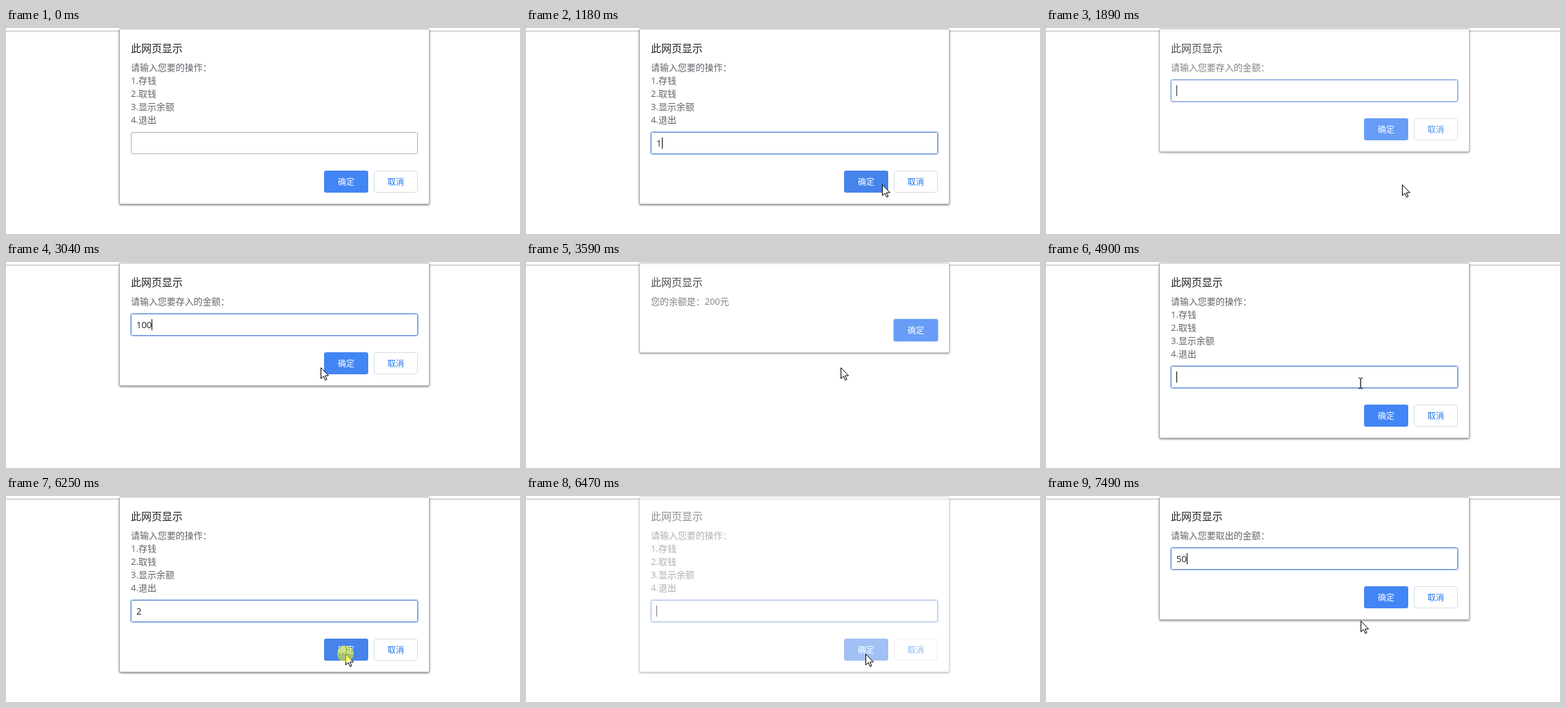
These frames come from a looping animation (745 by 299 pixels, 8000 ms). An HTML page:

```html
<!DOCTYPE html>
<html lang="zh-CN">
<head>
<meta charset="utf-8">
<style>
  html, body { margin: 0; width: 100%; height: 100%; overflow: hidden; background: #fff; }
  svg { display: block; }
  text { font: 13px "Open Sans", "Noto Sans CJK SC", "Noto Sans CJK", sans-serif; fill: #5f6368; white-space: pre; }
  .title { font-size: 15px; fill: #202124; }
  .value { fill: #202124; }
  .label { font-size: 12px; font-weight: 500; text-anchor: middle; }
  .panel { fill: #fff; stroke: #b2b2b2; filter: drop-shadow(0 1px 1.5px rgba(0, 0, 0, .55)); }
</style>
</head>
<body>
<svg id="stage" width="745" height="299" viewBox="0 0 745 299"></svg>
<script>
const LOOP = 8000;
const stage = document.getElementById('stage');

function add(parent, tag, attrs, text) {
  const el = document.createElementNS('http://www.w3.org/2000/svg', tag);
  for (const key in attrs) el.setAttribute(key, attrs[key]);
  if (text) el.textContent = text;
  parent.appendChild(el);
  return el;
}

function set(el, attrs) {
  for (const key in attrs) el.setAttribute(key, attrs[key]);
}

function show(el, visible) {
  el.style.display = visible ? '' : 'none';
}

function box(parent, x, y, width, height, rx, attrs) {
  return add(parent, 'rect', { x, y, width, height, rx, ...attrs });
}

function button(parent, x, y, label, primary) {
  const rect = primary
    ? box(parent, x, y, 64, 32, 3, { fill: '#4285f4' })
    : box(parent, x + .5, y + .5, 63, 31, 3.5, { fill: '#fff', stroke: '#dadce0' });
  add(parent, 'text', { class: 'label', x: x + 32, y: y + 20.5, style: `fill:${primary ? '#fff' : '#1a73e8'}` }, label);
  return rect;
}

// inputY is left out for a plain message box
function makeDialog(lines, height, inputY) {
  const group = add(stage, 'g', {});
  const okX = inputY ? 461 : 533, okY = height - 48;
  box(group, 164.5, 1.5, 449, height - 1, 2, { class: 'panel' });
  add(group, 'text', { class: 'title', x: 181, y: 35 }, '此网页显示');
  lines.forEach((line, i) => add(group, 'text', { x: 181, y: 62 + 19 * i }, line));
  const dialog = { group, inputY, okX, okY };
  if (inputY) {
    dialog.ring = box(group, 180.5, inputY - .5, 417, 33, 2.5, { fill: 'none', stroke: '#a9c4f4' });
    dialog.frame = box(group, 181.5, inputY + .5, 415, 31, 2, { fill: '#fff' });
    dialog.value = add(group, 'text', { class: 'value', x: 189, y: inputY + 21 });
    dialog.caret = box(group, 189, inputY + 8, 1, 16, 0, { fill: '#000' });
    button(group, 533, okY, '取消', false);
  } else {
    box(group, okX - 1, okY - 1, 66, 34, 4, { fill: '#b5cffb' });
  }
  dialog.ok = button(group, okX, okY, '确定', true);
  return dialog;
}

add(stage, 'path', { d: 'M0 4.5H745', stroke: '#b4b4b4' });

const menu = makeDialog(['请输入您要的操作：', '1.存钱', '2.取钱', '3.显示余额', '4.退出'], 255, 151);
const deposit = makeDialog(['请输入您要存入的金额：'], 179, 75);
const balance = makeDialog(['您的余额是：200元'], 131);
const withdraw = makeDialog(['请输入您要取出的金额：'], 179, 75);
const dialogs = [menu, deposit, balance, withdraw];

const arrow = add(stage, 'path', {
  d: 'M.5 .5V16.2L4.2 12.8L6.7 18.5L9 17.5L6.5 12H11.5Z', fill: '#fff', stroke: '#000'
});
const beam = add(stage, 'path', {
  d: 'M-3 -7.5H-.5M.5 -7.5H3M0 -7V7M-3 7.5H-.5M.5 7.5H3', fill: 'none', stroke: '#000', 'stroke-width': 1.2
});
const halo = add(stage, 'circle', { r: 12, fill: '#ff0', 'fill-opacity': .5 });

// [time, dialog] at which the next dialog starts to replace the last one
const scenes = [[-1000, menu], [1720, deposit], [3420, balance], [4670, menu], [6410, withdraw]];

// [time, typed value]
const typing = [
  [810, ''], [1040, '1'], [1800, ''], [2640, '1'], [2960, '10'], [3040, '100'],
  [4720, ''], [5390, '2'], [6460, ''], [7360, '5'], [7490, '50']
];

const clicks = [[810, 870], [1640, 1720], [4610, 4670], [6250, 6410]];

// [start, end, steps, x, y]
const entry = [645, 312];
const moves = [
  [270, 580, 5, 381, 178], [1040, 1180, 3, 516, 227], [2120, 2350, 4, 456, 153],
  [4210, 4530, 5, 549, 98], [4750, 4900, 3, 456, 176], [4980, 4980, 1, 429, 170],
  [5070, 5070, 1, 427, 167], [5470, 5940, 7, 513, 226], [6020, 6180, 3, 492, 229],
  [6490, 6710, 4, 456, 181]
];

const lastIndex = (table, t) => table.findLastIndex(row => row[0] <= t);

function pointerAt(t) {
  const i = lastIndex(moves, t);
  if (i < 0) return null;
  const [start, end, steps, x, y] = moves[i];
  const [fromX, fromY] = i ? moves[i - 1].slice(3) : entry;
  const stride = (end - start) / (steps - 1 || 1) || 1;
  const u = Math.min(1, (Math.floor((t - start) / stride + .001) + 1) / steps);
  return [fromX + (x - fromX) * u, fromY + (y - fromY) * u];
}

function sceneAt(t) {
  const i = lastIndex(scenes, t);
  const step = Math.floor((t - scenes[i][0]) / 77);
  if (i && step < 1) return { dialog: scenes[i - 1][1], opacity: .5 };
  return { dialog: scenes[i][1], opacity: i ? [0, .4, .8][step] || 1 : 1 };
}

function drawInput(dialog, t) {
  const i = lastIndex(typing, t);
  const [since, value] = i < 0 ? [0, ''] : typing[i];
  const focused = i >= 0;
  show(dialog.ring, focused);
  set(dialog.frame, { stroke: focused ? '#6b90d2' : '#aeaeae' });
  dialog.value.textContent = value;
  set(dialog.caret, { x: 189 + Math.round(value.length * 7.44) + (value.length === 1 ? 1 : 0) });
  show(dialog.caret, focused && Math.floor((t - since) / 530) % 2 === 0 || t > 1040 && t < 1640);
}

function render(t) {
  const { dialog, opacity } = sceneAt(t);
  dialogs.forEach(d => show(d.group, d === dialog));
  set(dialog.group, { opacity });
  if (dialog.inputY) drawInput(dialog, t);

  const pointer = pointerAt(t);
  const inside = (x, y, w, h) => pointer && pointer[0] >= x && pointer[0] < x + w && pointer[1] >= y && pointer[1] < y + h;
  const pressed = clicks.some(([start, end]) => t >= start && t < end);
  const hover = inside(dialog.okX, dialog.okY, 64, 32);
  const overInput = dialog.inputY && inside(181, dialog.inputY, 416, 32);
  const hoverFill = pressed && dialog === balance ? '#6ea1f9' : '#4683ea';
  set(dialog.ok, { fill: hover ? hoverFill : '#4285f4' });

  show(arrow, pointer && !overInput);
  show(beam, pointer && overInput);
  show(halo, pointer && pressed);
  if (pointer) {
    const transform = `translate(${pointer.map(Math.round)})`;
    [arrow, beam, halo].forEach(el => set(el, { transform }));
  }
}

const origin = performance.now();
function tick() {
  render((performance.now() - origin) % LOOP);
  requestAnimationFrame(tick);
}
tick();
</script>
</body>
</html>
```
